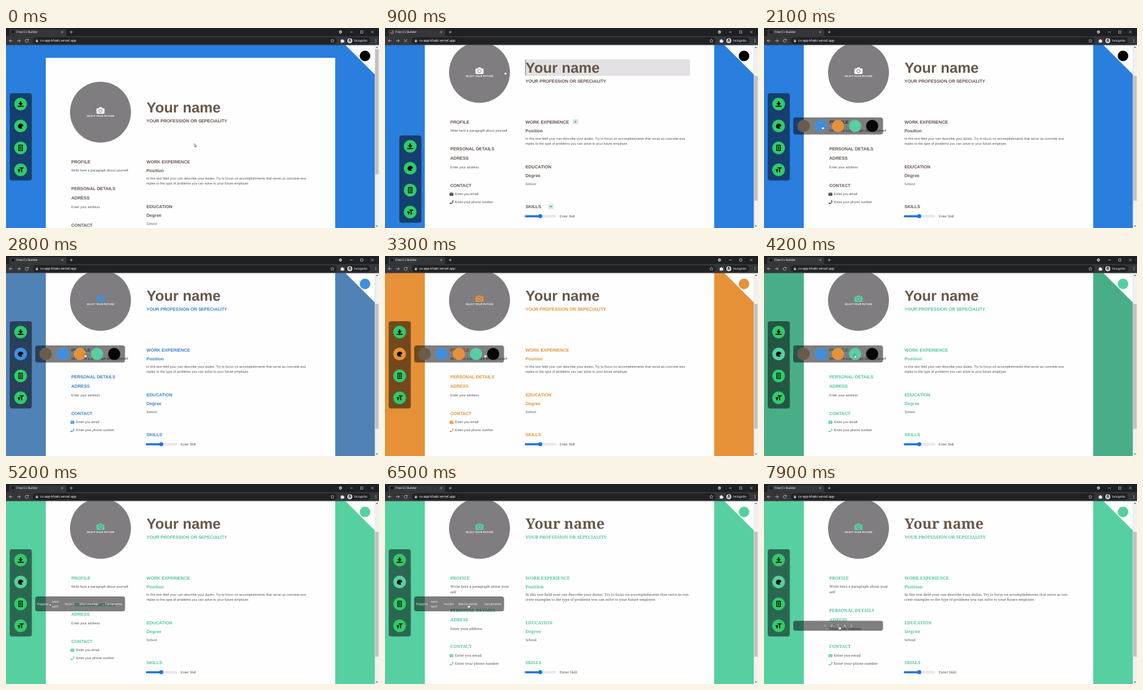
Write an HTML page that moves like this. It is 600 px wide and 322 px high and loops after 8 s.

```html
<!DOCTYPE html>
<html lang="en">
<head>
<meta charset="utf-8">
<title>Free Cv Builder</title>
<style>
html, body { margin: 0; height: 100%; overflow: hidden; }
svg { display: block; }
#stage { width: 100vw; height: 100vh; }
text { font-family: var(--f); text-rendering: geometricPrecision; }
.n { font-size: var(--n); font-weight: var(--w); fill: #675748; }
.h { font-size: var(--h); font-weight: var(--w); fill: var(--head); }
.b { font-size: var(--b); fill: #555; }
.ui { font: 5.1px Roboto, sans-serif; fill: #e8eaed; }
.pop { font: 4.9px "Open Sans", sans-serif; fill: #fff; }
.line { fill: none; stroke: #c4c7cb; stroke-width: .8; }
.glyph { fill: none; stroke: #000; stroke-width: 1.6; }
</style>
</head>
<body>
<svg id="stage" viewBox="0 0 600 322" preserveAspectRatio="none">
  <rect id="bg" width="600" height="322"/>

  <g id="page">
    <rect x="64" y="48" width="465.500" height="600" fill="#fffeff"/>
    <circle cx="152" cy="135.500" r="49" fill="#807d80"/>
    <path fill="var(--cam)" d="M146.800 129.300h2.200l1.200-1.800h3.600l1.200 1.800h2.200q1.300 0 1.300 1.300v6q0 1.300-1.300 1.300h-10.400q-1.300 0-1.300-1.300v-6q0-1.300 1.300-1.300z"/>
    <circle cx="152" cy="133.300" r="2.700" fill="var(--cam)" stroke="#807d80"/>
    <text x="152" y="143" text-anchor="middle" style="font:600 4.150px 'Open Sans',sans-serif" fill="#fff">SELECT YOUR PICTURE</text>

    <g id="hover">
      <rect x="225" y="114.500" width="265.500" height="26.500" rx="2" fill="#e2e0e2"/>
      <path d="M226 115v25.500" stroke="#675748" stroke-width=".7"/>
      <g fill="#cfe9dc">
        <rect x="302" y="211" width="8.500" height="8" rx="1"/>
        <rect x="262.500" y="347.500" width="8.500" height="8" rx="1"/>
      </g>
      <path d="M304.800 215h3M306.300 213.500v3M265.300 351.500h3M266.800 350v3" stroke="#3a7d5c" stroke-width=".7"/>
    </g>

    <text class="n" x="226" y="136">Your name</text>
    <text class="h" x="226" y="151.500">YOUR PROFESSION OR SEPECIALITY</text>

    <text class="h" x="226" y="217.600">WORK EXPERIENCE</text>
    <text class="h" x="226" y="231.600">Position</text>
    <text class="b" x="226" y="243.500" id="duty1"></text>
    <text class="b" x="226" y="252.400" id="duty2"></text>
    <text class="h" x="226" y="290.400">EDUCATION</text>
    <text class="h" x="226" y="304.400">Degree</text>
    <text class="b" x="226" y="316.800">School</text>
    <text class="h" x="226" y="354.100">SKILLS</text>
    <rect x="225" y="365.700" width="49.500" height="2.800" rx="1.400" fill="#efefef" stroke="#b8b8b8" stroke-width=".4"/>
    <rect x="224.800" y="365.500" width="25" height="3.200" rx="1.600" fill="#1a73e8"/>
    <circle cx="249.700" cy="367" r="3.200" fill="#1a73e8"/>
    <text class="b" x="281" y="369.300">Enter Skill</text>

    <text class="h" x="105" y="217.600">PROFILE</text>
    <text class="b" x="105" y="231.200" id="about1"></text>
    <text class="b" x="105" y="239.900" id="about2"></text>
    <g id="details">
      <text class="h" x="105" y="260.900">PERSONAL DETAILS</text>
      <text class="h" x="105" y="276.400">ADRESS</text>
      <text class="b" x="105" y="289.900">Enter your address</text>
      <text class="h" x="105" y="319.700">CONTACT</text>
      <g fill="var(--icon)">
        <rect x="103.700" y="329.200" width="6.300" height="4.700" rx=".6"/>
        <path d="M108.600 341.600l1.400.4q0 5.300-5.800 5.400l-.4-1.500 1.700-.8.900.9q1.900-.9 2.400-2.300l-.9-.7z"/>
      </g>
      <path d="M103.700 330l3.100 2.200 3.200-2.200" fill="none" stroke="#fff" stroke-width=".6"/>
      <text class="b" x="112.500" y="333.400">Enter you email</text>
      <text class="b" x="112.500" y="346.300">Enter your phone number</text>
    </g>
  </g>

  <path d="M546 27.500h47.500v47.500z" fill="#fff"/>
  <circle cx="577.500" cy="45" r="8.500" fill="var(--mark)"/>

  <g id="tools">
    <rect x="6" y="105" width="35.500" height="140.500" rx="4" fill-opacity=".5"/>
    <g fill="#2fcb6b">
      <circle cx="23.500" cy="122.500" r="10.300"/>
      <circle cx="23.500" cy="157.800" r="10.300" style="fill:var(--pal)"/>
      <circle cx="23.500" cy="193" r="10.300"/>
      <circle cx="23.500" cy="228.300" r="10.300"/>
    </g>
    <path d="M22.300 118.300h2.400v3h2.500l-3.700 3.700-3.700-3.700h2.500zM18.700 125.300h9.600v1.700h-9.600z"/>
    <path d="M19.300 158.300c0-5.700 8.100-5.200 8.500-1.300.1 1.900-2.800 1.100-3 2.500-.2 1.300 1.700.9 1.400 1.900-.5 1.400-6.900 1.300-6.900-3.100z"/>
    <path class="glyph" style="stroke-width:1.100" d="M20.500 188.600h6v8.800h-6zM21.800 191h3.400M21.800 193h3.400M21.800 195h3.400"/>
    <path class="glyph" d="M22 225.200h6.400M25.200 225.200v7M18.800 228.400h4.200M20.900 228.400v3.800"/>
  </g>

  <g id="colors">
    <rect x="47" y="144" width="144.500" height="27.500" rx="4" fill-opacity=".5"/>
    <g id="swatches" stroke="#8a8a8a" stroke-width=".5" stroke-dasharray="1"></g>
  </g>
  <g id="fonts">
    <rect x="47" y="181" width="144.500" height="24" rx="4" fill-opacity=".5"/>
    <text class="pop" x="50" y="195" font-weight="600">Poppins</text>
    <text class="pop" x="74" y="191">sans-</text>
    <text class="pop" x="74" y="199">serif</text>
    <text class="pop" x="95" y="195">Nunito</text>
    <text class="pop" x="118" y="195">Merriweather</text>
    <text class="pop" x="160" y="195">Sacramento</text>
  </g>
  <g id="sizes">
    <rect x="47" y="220.300" width="144.500" height="16" rx="4" fill-opacity=".5"/>
    <text class="pop" y="230" x="96.500 107.300 118 128.400 139">12345</text>
  </g>

  <rect x="593.300" y="27" width="6.700" height="295" fill="#f1f1f1"/>
  <rect id="thumb" x="594" width="5.400" height="201" fill="#c1c1c1"/>
  <path d="M595 32l1.700-2 1.700 2zM595 318l1.700 2 1.700-2z" fill="#555"/>

  <rect width="600" height="13.500" fill="#1f2023"/>
  <path d="M3 13.500q2 0 2-2v-7q0-2.500 2.500-2.500h87q2.500 0 2.500 2.500v7q0 2 2 2z" fill="#35363a"/>
  <rect y="13" width="600" height="14.500" fill="#35363a"/>
  <rect x="43" y="15" width="489" height="10.800" rx="5.400" fill="#202124"/>
  <rect id="favicon" x="9.500" y="4.800" width="3.400" height="3.400" fill="#0b0b0c"/>
  <path id="spinner" class="line" d="M11.200 4.300a2.300 2.300 0 1 1-2.300 2.300"/>
  <text class="ui" x="17" y="8.400">Free Cv Builder</text>
  <path class="line" d="M89 5l3 3M92 5l-3 3M102.800 6.500h4.400M105 4.300v4.400M5.300 20.500h5M7.600 18.200l-2.300 2.300 2.300 2.300M18 20.500h5M20.700 18.200l2.300 2.300-2.300 2.300M553.500 6.500h4M570.500 4.700h3.600v3.600h-3.600zM587.500 4.700l3.600 3.600M591.100 4.700l-3.600 3.600"/>
  <path id="reload" class="line" d="M35.300 19a2.500 2.500 0 1 0 .6 2M36 17.700v1.800h-1.800"/>
  <path id="stop" class="line" d="M31 18.300l4.400 4.400M35.400 18.300l-4.400 4.400"/>
  <path d="M48 20h3.400v2.600h-3.400z" fill="#c4c7cb"/>
  <path class="line" style="stroke-width:.6" d="M48.700 20v-.8a1 1 0 0 1 2 0v.8M525 17.800l.8 1.800 2 .2-1.500 1.300.5 2-1.800-1-1.800 1 .5-2-1.500-1.300 2-.2z"/>
  <text class="ui" style="font-size:5.600px" x="55" y="22.400">cv-app-khaki.vercel.app</text>
  <circle cx="538" cy="6.500" r="2.400" fill="#c4c7cb"/>
  <path d="M536.700 6l1.300 1.500 1.300-1.500z" fill="#1f2023"/>
  <path d="M538.500 19h1.500a1 1 0 0 1 2 0h1.400v1.500a1 1 0 0 1 0 2v1h-4.900z" fill="#e8eaed"/>
  <rect x="547" y="15" width="39" height="10.800" rx="5.400" fill="#202124"/>
  <circle cx="553" cy="20.400" r="4" fill="#e8eaed"/>
  <path d="M550.300 20.200h5.400M551.600 19.800l.4-1.700h2l.4 1.700z" stroke="#35363a" stroke-width=".6"/>
  <g fill="#35363a"><circle cx="551.800" cy="21.800" r=".9"/><circle cx="554.200" cy="21.800" r=".9"/></g>
  <text class="ui" x="560" y="22.300">Incognito</text>
  <g fill="#c4c7cb"><circle cx="595" cy="18.400" r=".6"/><circle cx="595" cy="20.400" r=".6"/><circle cx="595" cy="22.400" r=".6"/></g>

  <g id="cursor" stroke="#222" stroke-width=".5" fill="#fff">
    <path id="arrow" d="M0 0v5.200l1.200-1.100.9 1.900.8-.4-.9-1.800h1.600z"/>
    <path id="hand" d="M-.6.200q.6-.7 1.200 0v2.200l2.300.6q.6.300.4 1.200l-.6 2.300h-3l-2-2.800q0-.7.7-.6l1 .7z"/>
  </g>
</svg>

<script>
const $ = id => document.getElementById(id);
const LOOP = 8000, SCROLL = 64;
const BROWN = '#6b5b4b', BLUE = '#3f8fe0', ORANGE = '#e69138', GREEN = '#56cfa1', BLACK = '#060606';

$('swatches').innerHTML = [BROWN, BLUE, ORANGE, GREEN, BLACK]
  .map((c, i) => `<circle cx="${64 + 27.5 * i}" cy="157.700" r="9.900" fill="${c}"/>`).join('');

// [time, x, y]
const cursorKeys = [[0, 303, 186], [100, 303, 186], [300, 22, 110], [350, 22, 110], [520, 39, 178],
  [700, 300, 62], [780, 280, 64], [900, 193, 69], [1000, 190, 69], [1300, 24, 157], [1700, 24, 157],
  [2100, 94, 157], [2500, 94, 157], [2800, 127, 157], [3000, 120, 157], [3400, 174, 157],
  [3550, 174, 157], [3800, 140, 162], [4100, 146, 158], [4300, 146, 158], [4650, 24, 193],
  [4850, 24, 193], [5200, 70, 192], [5500, 60, 193], [5850, 102, 193], [6400, 134, 193],
  [6700, 134, 193], [7100, 24, 229], [7400, 24, 229], [7900, 121, 228]];
const dragKeys = [[350, 0, 0], [520, 17, 68]];
const scrollKeys = [[560, 0], [700, SCROLL]];
const bgKeys = [[2500, 41, 126, 222], [2800, 80, 130, 181], [3050, 230, 145, 56], [3500, 230, 145, 56],
  [3800, 80, 45, 16], [3950, 6, 6, 6], [4250, 86, 207, 161]];

// [time, accent, heading colour]
const themes = [[0, null, '#63534a'], [2250, BLUE, '#3880c6'], [2950, ORANGE, ORANGE],
  [3450, BLACK, BLACK], [4000, GREEN, '#52c59a']];
// [time, family, weight, name, heading and body sizes]
const fonts = [
  [0, 'Arial, "Liberation Sans", sans-serif', 700, 23.45, 7.08, 5.45],
  [5500, 'Inter, sans-serif', 700, 22, 6.7, 5],
  [5900, '"Open Sans", sans-serif', 700, 22.3, 6.9, 5.3],
  [6400, '"Noto Serif", serif', 600, 23.1, 7.08, 5.67]];
const duty = 'In this text field your can describe your duties. Try to focus on accomplishments that serve as concrete exa|mples to the type of problems you can solve to your future employer.';

function tween(keys, t) {
  const i = keys.findIndex(k => k[0] > t);
  if (i === 0) return keys[0].slice(1);
  if (i < 0) return keys[keys.length - 1].slice(1);
  const a = keys[i - 1], b = keys[i], p = (t - a[0]) / (b[0] - a[0]);
  return a.slice(1).map((v, j) => v + (b[j + 1] - v) * p);
}
const current = (list, t) => list.filter(k => k[0] <= t).pop();
const show = (id, on) => $(id).setAttribute('visibility', on ? 'visible' : 'hidden');
const move = (id, x, y) => $(id).setAttribute('transform', `translate(${x} ${y})`);
const setVar = (name, value) => $('stage').style.setProperty('--' + name, value);
function setText(id, s) { if ($(id).textContent !== s) $(id).textContent = s; }

function draw(t) {
  const [scroll] = tween(scrollKeys, t), [x, y] = tween(cursorKeys, t);
  const [, color, heading] = current(themes, t);
  const [, family, weight, name, head, body] = current(fonts, t);
  const serif = t >= 6400, loading = t >= 800 && t < 1200;

  $('bg').setAttribute('fill', `rgb(${tween(bgKeys, t).map(Math.round)})`);
  setVar('head', heading);
  setVar('cam', color || '#fff');
  setVar('icon', color || '#3d3835');
  setVar('mark', color || '#000');
  setVar('pal', color || '#2fcb6b');
  setVar('f', family);
  setVar('w', weight);
  setVar('n', name + 'px');
  setVar('h', head + 'px');
  setVar('b', body + 'px');

  const [first, rest] = duty.split('|');
  setText('duty1', serif ? first.slice(0, -9) : first);
  setText('duty2', serif ? first.slice(-9) + rest : rest);
  setText('about1', 'Write here a paragraph about your' + (serif ? '' : 'self'));
  setText('about2', serif ? 'self' : '');
  move('details', 0, serif ? 8.7 : 0);

  move('page', 0, -scroll);
  $('thumb').setAttribute('y', 34.5 + scroll * 0.665);
  move('tools', ...(t < 1150 ? tween(dragKeys, t) : [0, 0]));
  show('hover', t >= 700 && t < 1050);
  show('favicon', !loading);
  show('spinner', loading);
  $('spinner').setAttribute('transform', `rotate(${(t - 900) * 0.6} 11.200 6.600)`);
  show('reload', !loading);
  show('stop', loading);
  show('colors', t >= 1500 && t < 4500);
  show('fonts', t >= 4700 && t < 6900);
  show('sizes', t >= 7150);

  const pointing = x < 195 && t > 250 && !(t > 5100 && t < 5300);
  move('cursor', x, y);
  show('arrow', !pointing);
  show('hand', pointing);
}

const start = performance.now();
function tick() {
  draw((performance.now() - start) % LOOP);
  requestAnimationFrame(tick);
}
tick();
</script>
</body>
</html>
```
